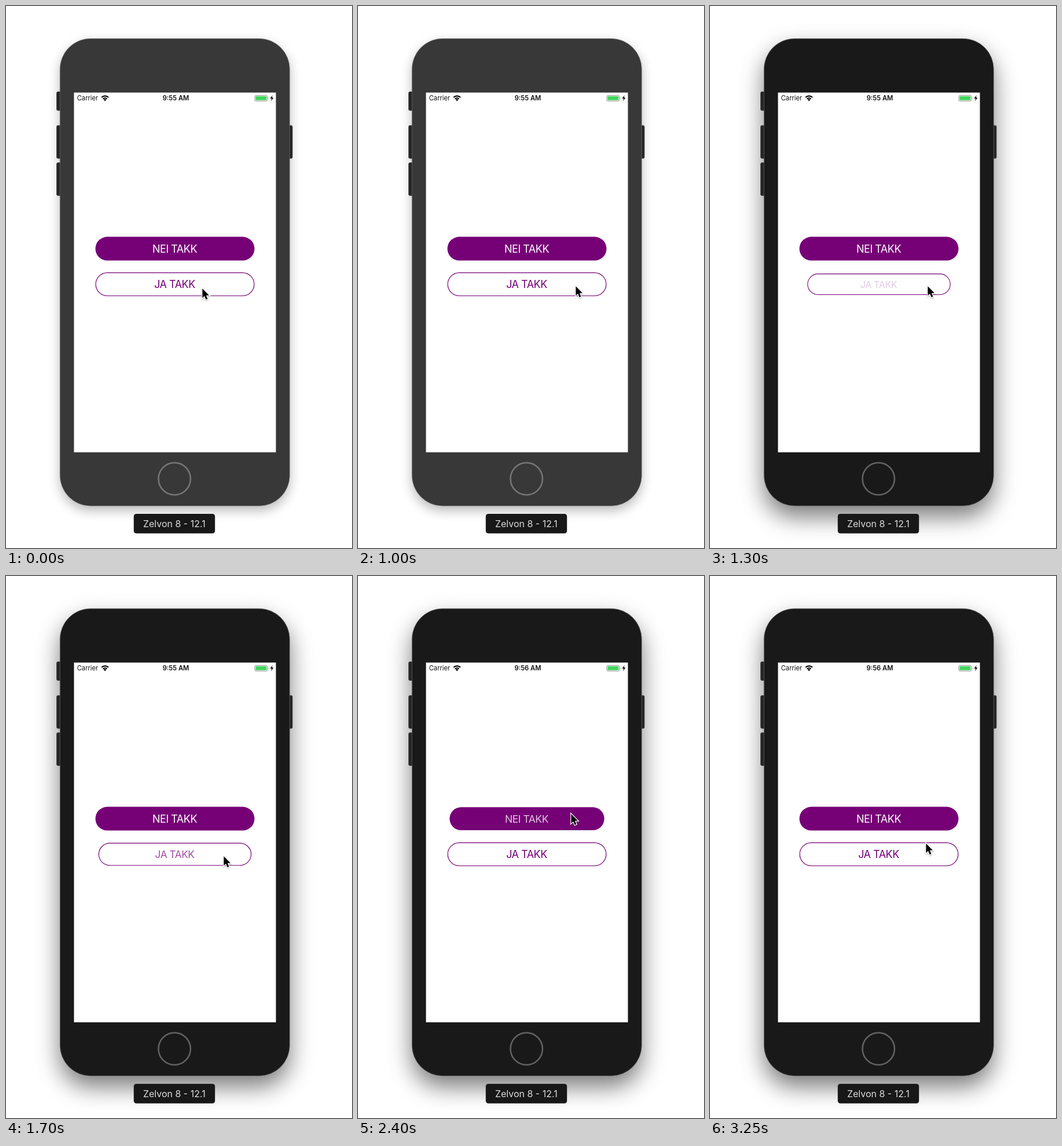
An HTML page for the animation above (3.3 s loop, 598 px wide and 936 px high).

```html
<!DOCTYPE html>
<html lang="no">
<head>
<meta charset="utf-8">
<title>Button press</title>
<style>
  html, body { margin: 0; width: 100%; height: 100%; overflow: hidden; background: #fff; }
  svg { display: block; width: 598px; height: 936px; }
  text { font-family: Inter, Roboto, sans-serif; text-anchor: middle; }
  .status { font-size: 11.2px; }
  .label { font-size: 18px; letter-spacing: -0.5px; }
</style>
</head>
<body>
<svg viewBox="0 0 598 936">
  <defs>
    <rect id="body" x="93.3" y="56.3" width="397" height="807" rx="53"/>
    <filter id="soft" x="-30%" y="-20%" width="160%" height="140%"><feGaussianBlur stdDeviation="10"/></filter>
    <filter id="deep" x="-30%" y="-20%" width="160%" height="140%"><feGaussianBlur stdDeviation="20"/></filter>
    <filter id="cursorShadow" x="-50%" y="-50%" width="200%" height="200%">
      <feDropShadow dx="0" dy="1.2" stdDeviation="1" flood-opacity="0.35"/>
    </filter>
  </defs>

  <use id="idleShadow" href="#body" y="8" opacity="0.28" filter="url(#soft)"/>
  <use id="activeShadow" href="#body" y="19" opacity="0.52" filter="url(#deep)"/>

  <g fill="#242526" stroke="#333" stroke-width="0.6">
    <rect x="87.5" y="148" width="9" height="32.5" rx="2.5"/>
    <rect x="87.5" y="206.3" width="9" height="57" rx="2.5"/>
    <rect x="87.5" y="270.5" width="9" height="57" rx="2.5"/>
    <rect x="486" y="206.3" width="9" height="57" rx="2.5"/>
  </g>
  <use id="shell" href="#body" stroke="#777" stroke-width="0.6"/>
  <rect x="117.5" y="149.5" width="349" height="621.2" fill="#fff"/>
  <circle id="home" cx="291.2" cy="816.5" r="27.7" fill="none" stroke-width="2.6"/>

  <text class="status" x="141" y="163" fill="#111">Carrier</text>
  <g fill="none" stroke="#000" stroke-width="2.1">
    <path d="M165.2 157.8a8.4 8.4 0 0 1 11.8 0"/>
    <path d="M167.6 160.5a5 5 0 0 1 7 0"/>
  </g>
  <path d="M171.1 164.2l-2.2-2.3a3.1 3.1 0 0 1 4.4 0z"/>
  <text class="status" id="clock" x="293.5" y="163" font-weight="600" fill="#111"></text>
  <rect x="429.9" y="154.4" width="21.8" height="9.8" rx="2.2" fill="#fff" stroke="#888" stroke-width="0.9"/>
  <rect x="431.3" y="155.8" width="19" height="7" rx="1" fill="#43d65c"/>
  <path d="M452.9 157.6q1.6 1.7 0 3.4z" fill="#888"/>
  <path d="M460.8 154l-4.3 5.8h2.7l-1.2 4.4 4.3-6h-2.7z"/>

  <g id="no">
    <rect x="154.5" y="398.6" width="275" height="41" rx="20.5" fill="#760076"/>
    <text class="label" x="291.5" y="425.7" fill="#fff">NEI TAKK</text>
  </g>
  <g id="yes">
    <rect x="155.1" y="460.6" width="273.8" height="39.9" rx="19.95" fill="#fff" stroke="#760076" stroke-width="1.2"/>
    <text class="label" x="291.5" y="487.2" fill="#760076">JA TAKK</text>
  </g>

  <rect x="220.8" y="877" width="140.4" height="33.7" rx="4.5" fill="#181818"/>
  <text x="290.8" y="900.4" font-size="16" fill="#dcdcdc">Zelvon 8 - 12.1</text>

  <g id="cursor" filter="url(#cursorShadow)">
    <path d="M.4 1V17.2L4 13.7 6.7 19.9 9.5 18.7 6.9 12.7H12Z" stroke="#fff" stroke-width="2.4" paint-order="stroke"/>
  </g>
</svg>
<script>
const LOOP = 3300, STEP = 50;
const PRESS_MS = 170, RELEASE_MS = 600;
const FOCUS_AT = 1050, MINUTE_AT = 2150;

const $ = id => document.getElementById(id);
const clamp = v => Math.min(1, Math.max(0, v));
const lerp = (a, b, p) => a + (b - a) * p;
const linear = p => p;
const easeOut = p => 1 - (1 - p) ** 2;
const easeInOut = p => p < .5 ? 4 * p ** 3 : 1 - 4 * (1 - p) ** 3;
const smooth = p => p * p * (3 - 2 * p);

const buttons = [
  { node: $("yes"), cy: 480.5, down: 1065, up: 1375 },
  { node: $("no"), cy: 419.1, down: 2330, up: 2640 }
];

// time, x, y, easing used to arrive there
const cursorPath = [
  [0, 339, 487, linear],
  [600, 376, 483, smooth],
  [1850, 376, 483, linear],
  [2000, 372, 426, linear],
  [2200, 368, 410, easeOut],
  [2900, 368, 410, linear],
  [3120, 374, 464, smooth],
  [3250, 373, 461, smooth]
];

function cursorAt(t) {
  const i = cursorPath.findIndex(key => key[0] > t);
  if (i < 0) return cursorPath.at(-1).slice(1, 3);
  const [t0, x0, y0] = cursorPath[i - 1];
  const [t1, x1, y1, ease] = cursorPath[i];
  const p = ease((t - t0) / (t1 - t0));
  return [lerp(x0, x1, p), lerp(y0, y1, p)];
}

function drawButton({ node, cy, down, up }, t) {
  const pressed = t < up
    ? easeInOut(clamp((t - down) / PRESS_MS))
    : 1 - easeInOut(clamp((t - up) / RELEASE_MS));
  const scale = 1 - .1 * pressed;
  node.setAttribute("transform", `translate(292 ${cy}) scale(${scale}) translate(-292 ${-cy})`);
  node.querySelector("text").setAttribute("opacity", 1 - .8 * pressed);
}

function render(t) {
  const active = t >= FOCUS_AT;
  $("shell").setAttribute("fill", active ? "#191919" : "#383838");
  $("home").setAttribute("stroke", active ? "#626262" : "#767676");
  $("idleShadow").style.display = active ? "none" : "";
  $("activeShadow").style.display = active ? "" : "none";
  $("clock").textContent = t < MINUTE_AT ? "9:55 AM" : "9:56 AM";
  buttons.forEach(button => drawButton(button, t));
  $("cursor").setAttribute("transform", `translate(${cursorAt(t)})`);
}

const start = performance.now();
function tick() {
  const t = (performance.now() - start) % LOOP;
  render(Math.floor(t / STEP) * STEP);
  requestAnimationFrame(tick);
}
tick();
</script>
</body>
</html>
```
